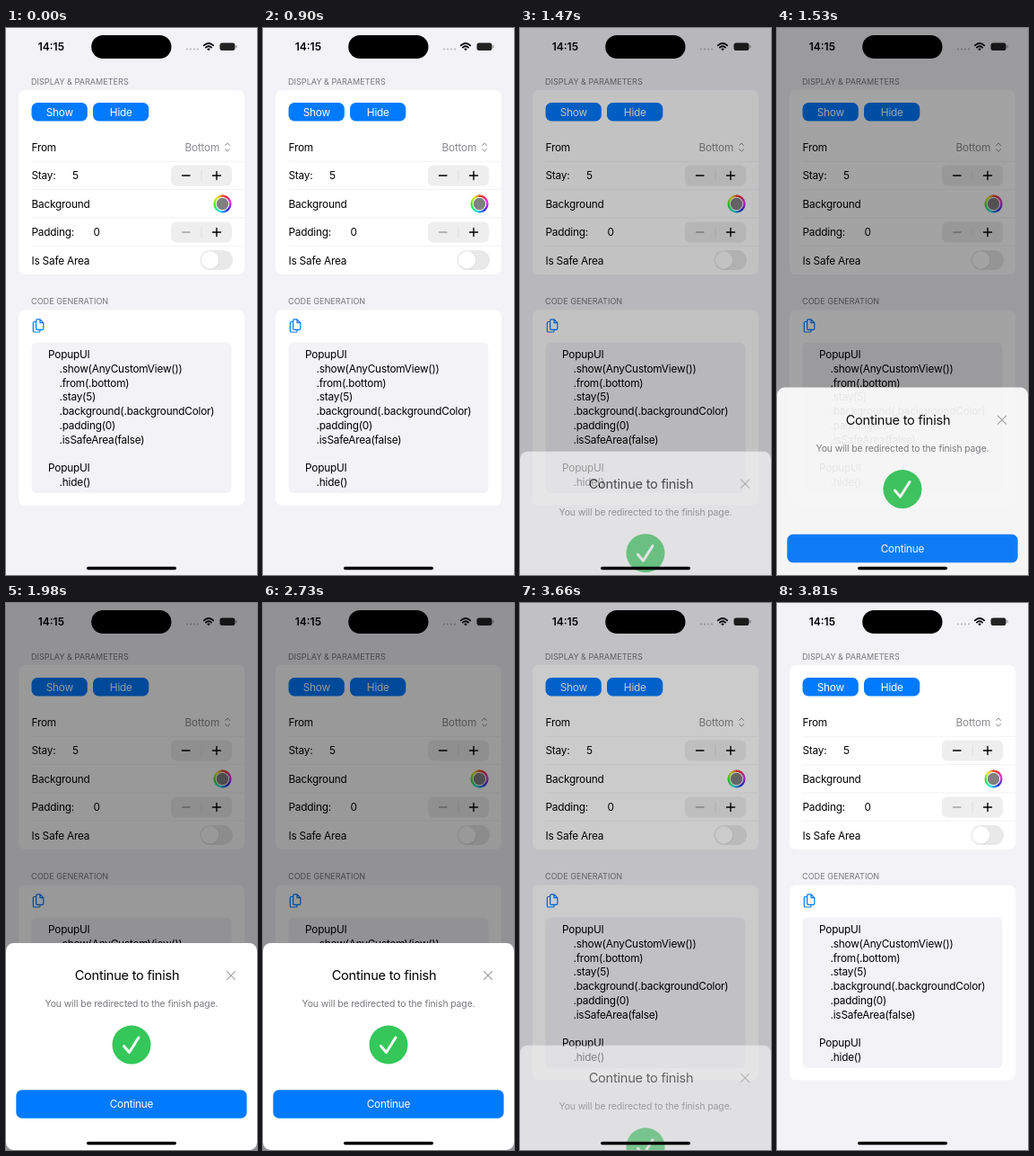
An HTML page that plays this animation: 280x608 px, repeating every 4.26 s.

```html
<!DOCTYPE html>
<html lang="en">
<head>
<meta charset="utf-8">
<title>Popup demo</title>
<style>
  html, body { margin: 0; width: 100%; height: 100%; overflow: hidden; background: #f2f2f7; }
  svg { display: block; width: 280px; height: 608px; }
  text { font: 11.8px Inter, "Open Sans", sans-serif; letter-spacing: -.2px; white-space: pre; }
  .header { font-size: 9.1px; letter-spacing: 0; fill: #77777c; }
  .mid { text-anchor: middle; }
  .white { fill: #fff; }
  .gray { fill: #8a8a8e; }
  .line { fill: none; stroke-linecap: round; stroke-linejoin: round; }
  .clock { font-size: 12px; font-weight: 600; letter-spacing: 0; }
  .title { font-size: 14.6px; letter-spacing: -.25px; }
  .note { font-size: 10.4px; letter-spacing: -.1px; fill: #78787d; }
</style>
</head>
<body>
<svg viewBox="0 0 280 608">
  <rect width="280" height="608" fill="#f2f2f7"/>

  <!-- status bar -->
  <text class="clock" x="35.700" y="25">14:15</text>
  <rect x="95.200" y="8" width="89.300" height="26" rx="13"/>
  <path class="line" d="M202 23.500H215" stroke="#b4b4b8" stroke-width="2" stroke-dasharray="0 4"/>
  <path class="line" d="M220.800 19.300Q226 14.700 231.200 19.300M222.900 21.600Q226 18.900 229.100 21.600" stroke="#000" stroke-width="1.800"/>
  <path d="M226 25.200L224.200 23.300Q226 21.900 227.800 23.300Z"/>
  <rect x="238.500" y="16.500" width="17" height="8.500" rx="2.800" fill="#222"/>
  <rect x="256.300" y="19.200" width="1.300" height="3" rx=".6" fill="#999"/>

  <!-- parameters -->
  <text class="header" x="28" y="63.200">DISPLAY &amp; PARAMETERS</text>
  <rect x="14" y="69" width="252" height="205" rx="7" fill="#fff"/>
  <path d="M28.500 148.300H266M28.500 179.600H266M28.500 210.900H266M28.500 242.200H266" stroke="#ececef" stroke-width=".7"/>
  <g fill="#007aff">
    <rect x="28.500" y="83" width="62.300" height="20.500" rx="6.500"/>
    <rect x="97" y="83" width="62.300" height="20.500" rx="6.500"/>
  </g>
  <text class="mid white" x="59.800" y="97.500">Show</text>
  <text class="mid white" x="128.300" y="97.500">Hide</text>
  <text x="28.500" y="137">From</text>
  <text class="gray" x="199.500" y="137">Bottom</text>
  <path class="line" d="M244.600 130.500L247.100 128L249.600 130.500M244.600 134.700L247.100 137.200L249.600 134.700" stroke="#8a8a8e"/>
  <text x="28.500" y="168.300">Stay:</text>
  <text x="74" y="168.300">5</text>
  <text x="28.500" y="199.800">Background</text>
  <text x="28.500" y="231">Padding:</text>
  <text x="97.500" y="231">0</text>
  <text x="28.500" y="262.500">Is Safe Area</text>
  <g id="steppers"></g>
  <g id="wheel" class="line" stroke-width="2.200"></g>
  <circle cx="241.500" cy="195.500" r="6.700" fill="#808080"/>
  <rect x="216.500" y="247" width="36.500" height="22" rx="11" fill="#e9e9ea"/>
  <circle cx="228" cy="258.400" r="10" fill="#000" opacity=".07"/>
  <circle cx="227.600" cy="258" r="9.700" fill="#fff"/>

  <!-- generated code -->
  <text class="header" x="28" y="307.300">CODE GENERATION</text>
  <rect x="14" y="313.500" width="252" height="217" rx="7" fill="#fff"/>
  <g class="line" stroke="#007aff" stroke-width="1.200">
    <path d="M33.500 326.500H31.500Q30.300 326.500 30.300 327.800V336.700Q30.300 338 31.500 338H36.700Q38 338 38 336.700V335.300M30.600 330.500"/>
    <path d="M34.900 323.800H38L41.800 327.700V334Q41.800 335.300 40.500 335.300H34.900Q33.600 335.300 33.600 334V325.100Q33.600 323.800 34.900 323.800ZM38 324V327.700H41.600"/>
  </g>
  <rect x="28.500" y="349.500" width="223" height="167.500" rx="6" fill="#f2f2f7"/>
  <g id="code"></g>

  <rect id="dim" width="280" height="608" opacity="0"/>

  <g id="sheet">
    <rect y="378" width="280" height="230" rx="8.500" fill="#fff"/>
    <text class="title mid" x="135" y="419.300">Continue to finish</text>
    <path class="line" d="M246.500 409.500L255.500 418.500M255.500 409.500L246.500 418.500" stroke="#a0a0a4" stroke-width="1.100"/>
    <text class="note mid" x="140" y="449.300">You will be redirected to the finish page.</text>
    <circle cx="140" cy="491" r="21.500" fill="#34c759"/>
    <path class="line" d="M131.500 492.500L137.500 499.500L148 483" stroke="#fff" stroke-width="3"/>
    <rect x="11.300" y="541.200" width="257.300" height="31.500" rx="6.500" fill="#007aff"/>
    <text id="label" class="mid white" x="140" y="561.200">Continue</text>
  </g>
  <rect x="90" y="598.800" width="100" height="3.400" rx="1.700"/>
</svg>
<script>
const LOOP = 4260, OPEN = 1387, PRESS = 3590, CLOSED = 3800, TRAVEL = 230, DIM = 0.4;
const byId = id => document.getElementById(id);

const codeLines = [
  'PopupUI', '.show(AnyCustomView())', '.from(.bottom)', '.stay(5)',
  '.background(.backgroundColor)', '.padding(0)', '.isSafeArea(false)', '',
  'PopupUI', '.hide()'
];
byId('code').innerHTML = codeLines.map((line, i) =>
  `<text x="${line[0] === '.' ? 59.5 : 47}" y="${367.2 + i * 15.72}">${line}</text>`).join('');

const stepper = (y, minusColor) => `
  <rect x="184" y="${y - 11.5}" width="68" height="23" rx="6" fill="#eeeeef"/>
  <path d="M218 ${y - 6}V${y + 6}" stroke="#d8d8dc" stroke-width=".8"/>
  <path class="line" d="M196.500 ${y}H205" stroke="${minusColor}" stroke-width="1.400"/>
  <path class="line" d="M230.500 ${y}H239.500M235 ${y - 4.5}V${y + 4.5}" stroke="#000" stroke-width="1.400"/>`;
byId('steppers').innerHTML = stepper(164, '#000') + stepper(227, '#a4a4a8');

// Hue wheel, running counter-clockwise from the top
const SEGMENTS = 36;
const wheelPoint = i => {
  const angle = -Math.PI / 2 - i / SEGMENTS * 2 * Math.PI;
  return `${241.5 + 8.8 * Math.cos(angle)} ${195.5 + 8.8 * Math.sin(angle)}`;
};
byId('wheel').innerHTML = Array.from({ length: SEGMENTS }, (_, i) =>
  `<path d="M${wheelPoint(i)}L${wheelPoint(i + 1)}" stroke="hsl(${20 + i * 360 / SEGMENTS} 80% 55%)"/>`).join('');

// Lightly damped spring from 0 to 1
function spring(ms) {
  if (ms <= 0) return 0;
  const x = ms * 0.021, damping = 0.8, w = 0.6;
  return 1 - Math.exp(-damping * x) * (Math.cos(w * x) + damping / w * Math.sin(w * x));
}

function draw(t) {
  const shown = t >= CLOSED ? 0 : spring(t - OPEN) - Math.min(1, spring(t - PRESS));
  const alpha = Math.max(0, Math.min(1, shown));
  byId('dim').setAttribute('opacity', DIM * alpha);
  byId('sheet').setAttribute('opacity', alpha);
  byId('sheet').setAttribute('transform', `translate(0 ${TRAVEL * (1 - shown)})`);
  byId('label').setAttribute('opacity', t >= PRESS ? 0.12 : 1);
}

const start = performance.now();
function tick() {
  draw((performance.now() - start) % LOOP);
  requestAnimationFrame(tick);
}
tick();
</script>
</body>
</html>
```
